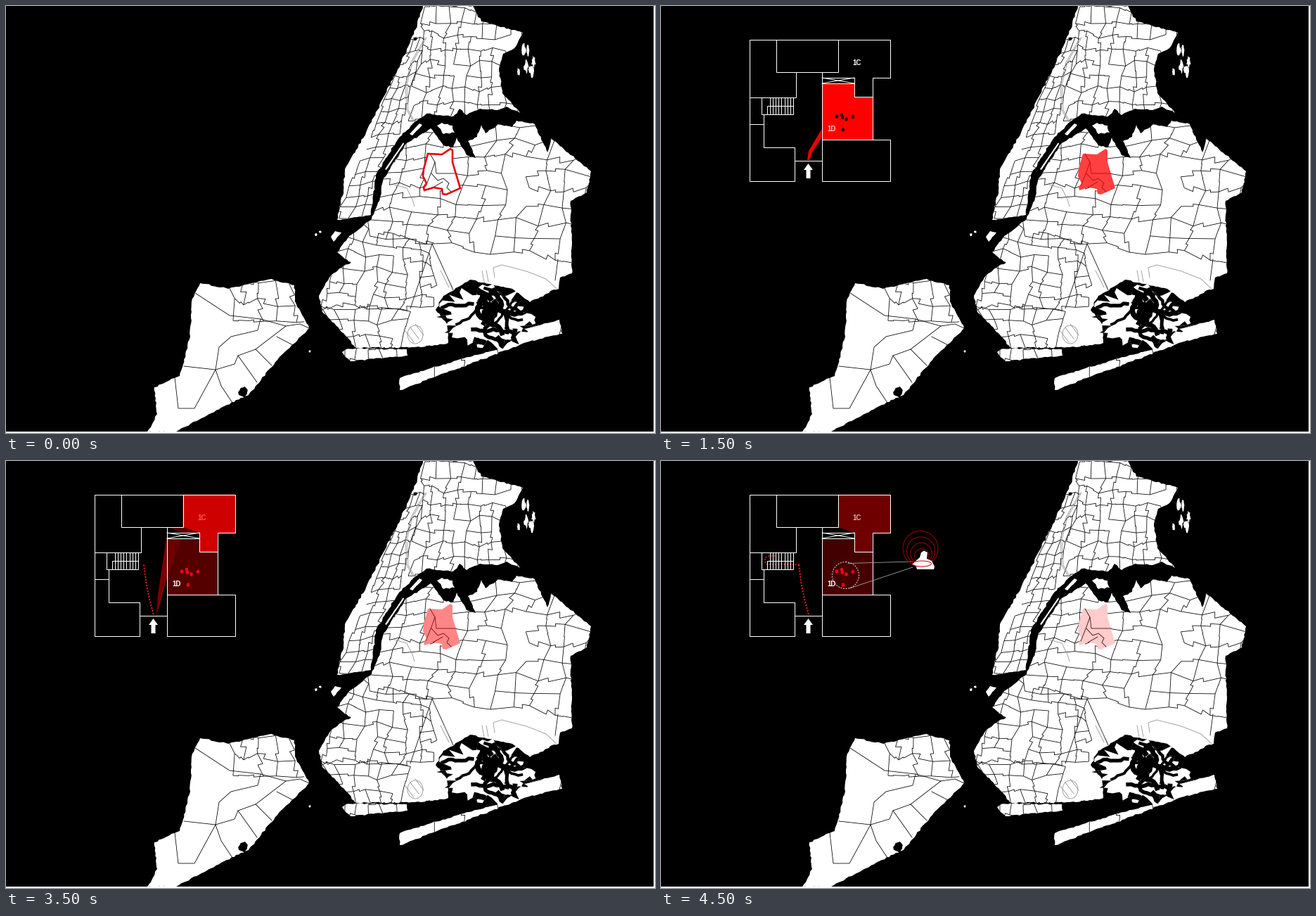
A matplotlib script that plays this animation: 923 px wide and 607 px high, repeating every 5 s.

```python
import math
import random

import matplotlib.pyplot as plt
from matplotlib.animation import FuncAnimation
from matplotlib.collections import LineCollection
from matplotlib.patches import Circle, Ellipse, Polygon, Rectangle

W, H, DPI = 923, 607, 100
PX = 72 / DPI
STEP_MS, STEPS = 500, 10

rng = random.Random(11)
fig = plt.figure(figsize=(W / DPI, H / DPI), dpi=DPI, facecolor="white")
ax = fig.add_axes([0, 0, 1, 1])
ax.set_xlim(0, W)
ax.set_ylim(H, 0)
ax.axis("off")


def pairs(flat):
    return list(zip(flat[::2], flat[1::2]))


def mix(a, b, t):
    return a[0] + (b[0] - a[0]) * t, a[1] + (b[1] - a[1]) * t


def poly(pts, color, z=1, alpha=1, edge="none", lw=0):
    return ax.add_patch(Polygon(pts, closed=True, fc=color, ec=edge,
                                lw=lw * PX, alpha=alpha, zorder=z))


def line(flat, color="black", lw=0.8, z=3, **kw):
    return ax.plot(flat[::2], flat[1::2], color=color, lw=lw * PX, zorder=z,
                   solid_joinstyle="miter", **kw)[0]


def disc(x, y, rx, ry, color="none", z=8, **kw):
    kw.setdefault("ec", "none")
    return ax.add_patch(Ellipse((x, y), 2 * rx, 2 * ry, fc=color, zorder=z, **kw))


# ---- map ----

def land(*flat, amp=1.0):
    """Closed coast through key points, roughened every few pixels."""
    pts, out = pairs(flat), []
    for a, b in zip(pts, pts[1:] + pts[:1]):
        n = max(1, round(math.dist(a, b) / 4))
        for k in range(n):
            x, y = mix(a, b, k / n)
            j = amp if k else 0
            out.append((x + rng.uniform(-j, j), y + rng.uniform(-j, j)))
    return poly(out, "white")


def blob(x, y, rx, ry, color="white", z=2, n=14, low=0.6):
    pts = []
    for k in range(n):
        a, r = math.tau * k / n, rng.uniform(low, 1.15)
        pts.append((x + rx * r * math.cos(a), y + ry * r * math.sin(a)))
    return poly(pts, color, z)


def border(a, b):
    """Edge from a to b; some edges take a right-angled step half way."""
    if rng.random() < 0.45:
        return [a, b]
    s, t = rng.uniform(-0.13, 0.13), rng.uniform(0.3, 0.7)
    dx, dy = b[0] - a[0], b[1] - a[1]
    x, y = mix(a, b, t)
    return [a, (x + dy * s, y - dx * s), (x - dy * s, y + dx * s), b]


def districts(shape, nw, ne, se, sw, cols, rows, jitter=0.27, keep=0.88):
    """Uneven grid of district borders in a quad, clipped to the land."""
    def node(i, j):
        u = (i + rng.uniform(-jitter, jitter)) / cols
        v = (j + rng.uniform(-jitter, jitter)) / rows
        return mix(mix(nw, ne, u), mix(sw, se, u), v)

    grid = [[node(i, j) for i in range(cols + 1)] for j in range(rows + 1)]
    edges = []
    for j in range(rows + 1):
        for i in range(cols + 1):
            if i < cols and rng.random() < keep:
                edges.append(border(grid[j][i], grid[j][i + 1]))
            if j < rows and rng.random() < keep:
                edges.append(border(grid[j][i], grid[j + 1][i]))
    lines = LineCollection(edges, colors="black", linewidths=0.8 * PX, zorder=3)
    ax.add_collection(lines)
    lines.set_clip_path(shape)


def marsh(x, y, rx, ry, channels):
    """Ragged wetland cut by wandering channels."""
    shape = blob(x, y, rx, ry, n=60, low=0.72)
    for _ in range(channels):
        px, py = x + rng.uniform(-rx, rx), y + rng.uniform(-ry, ry)
        heading, path = rng.uniform(0, math.tau), []
        for _ in range(14):
            path += [px, py]
            heading += rng.uniform(-0.8, 0.8)
            px += 5 * math.cos(heading)
            py += 5 * math.sin(heading)
        line(path, lw=rng.uniform(2, 8), z=2.5).set_clip_path(shape)


ax.add_patch(Rectangle((0, 0), 921, 605, fc="black", ec="none", zorder=0))

north = land(593, 0, 580, 40, 557, 90, 512, 180, 482, 232, 480, 262, 471, 304,
             519, 297, 526, 240, 557, 190, 578, 168, 598, 153, 636, 157,
             645, 146, 655, 155, 674, 146, 699, 148, 712, 143, 731, 152,
             706, 124, 701, 92, 707, 68, 723, 60, 735, 38, 676, 22, 664, 0)
main = land(520, 303, 532, 272, 537, 245, 570, 195, 604, 174, 622, 198, 636, 201,
            641, 187, 655, 212, 668, 216, 657, 192, 670, 186, 676, 169, 682, 181,
            700, 168, 720, 172, 726, 163, 752, 168, 770, 208, 775, 188,
            832, 235, 826, 265, 803, 277, 805, 380, 788, 386, 786, 402,
            745, 421, 720, 402, 660, 389, 622, 412, 611, 432, 627, 452,
            629, 479, 590, 485, 497, 486, 480, 465, 450, 435, 445, 412,
            462, 383, 486, 365, 471, 350, 486, 330)
beach = land(478, 492, 485, 487, 570, 488, 571, 497, 490, 505)
spit = land(560, 529, 640, 504, 705, 487, 735, 460, 787, 446, 791, 466,
            740, 478, 660, 509, 560, 546)
isle = land(276, 394, 316, 402, 378, 388, 410, 397, 411, 420, 431, 458,
            388, 500, 345, 553, 310, 569, 242, 605, 201, 605, 215, 580,
            211, 542, 247, 526, 262, 470, 264, 420)
land(462, 328, 468, 320, 477, 322, 466, 335)
land(613, 170, 620, 166, 635, 170, 638, 180, 622, 182)
land(539, 232, 565, 194, 566, 196, 541, 233, amp=0.2)
land(574, 182, 588, 167, 592, 169, 578, 184, amp=0.5)
for x, y in [(447, 321), (441, 325), (432, 491)]:
    blob(x, y, 2, 2)
for _ in range(7):
    blob(rng.uniform(722, 752), rng.uniform(60, 98), rng.uniform(2, 4), rng.uniform(5, 13))
marsh(685, 442, 66, 42, 24)
blob(338, 549, 8, 9, "black", 4)
blob(582, 47, 3, 3, "black", 4)
for x, y in [(482, 364), (782, 407), (600, 487)]:
    blob(x, y, 9, 4, "black", 4)

districts(north, (572, 50), (596, 45), (526, 300), (470, 305), 3, 15, 0.18)
districts(north, (596, 0), (735, 10), (725, 155), (576, 158), 8, 8)
districts(main, (545, 180), (845, 165), (810, 362), (510, 325), 10, 8)
districts(main, (478, 305), (606, 338), (612, 430), (450, 430), 7, 6)
districts(main, (450, 430), (575, 430), (562, 487), (470, 490), 6, 3)
districts(beach, (478, 485), (572, 485), (572, 505), (478, 505), 5, 1)
districts(spit, (560, 520), (790, 440), (790, 470), (560, 550), 5, 1, 0.1)
districts(isle, (322, 398), (425, 392), (430, 450), (318, 442), 5, 2)

for road in [
    (269, 408, 318, 440, 362, 445, 398, 455, 418, 452, 431, 458),
    (362, 445, 358, 461, 320, 470, 303, 485, 298, 517, 306, 540, 322, 564),
    (253, 512, 298, 517, 325, 509, 330, 497, 355, 488, 398, 455),
    (298, 517, 268, 572, 245, 572, 240, 528),
    (355, 488, 378, 511), (330, 497, 357, 535), (385, 470, 408, 482),
    (785, 360, 781, 390), (575, 430, 606, 338, 636, 404),
]:
    line(road)

GRAY = "#909090"
for dx in (0, 2):
    line((596 + dx, 45, 576 + dx, 80, 568 + dx, 112, 570 + dx, 148, 578 + dx, 162), GRAY)
for x in (618, 623, 677, 683):
    line((x, 376, x + 12 - (x > 650) * 9, 400 - (x > 650) * 8), GRAY)
line((552, 254, 570, 259, 578, 275, 581, 285), GRAY)
line((695, 386, 693, 372, 705, 368, 740, 377, 768, 388, 783, 402), GRAY)
for k in range(3):
    line((568 + 7 * k, 462 - 5 * k, 580 + 7 * k, 478 - 5 * k), GRAY)
disc(582, 467, 11, 13, ec=GRAY, lw=0.8 * PX, z=3)

DISTRICT = pairs([600, 210, 620, 211, 632, 203, 635, 205, 635, 222, 646, 259,
                  626, 268, 621, 267, 620, 260, 608, 258, 595, 262, 594, 258,
                  598, 252, 593, 242, 594, 232])
poly(DISTRICT, "white", 3.2)
for inner in [(603, 210, 610, 222, 605, 236, 597, 256), (610, 222, 612, 238, 640, 238),
              (605, 238, 614, 248, 622, 245, 630, 252, 627, 258, 633, 264),
              (607, 258, 621, 250)]:
    line(inner, z=3.4)


# ---- floor plan ----

def box(x0, y0, x1, y1):
    return x0, y0, x1, y0, x1, y1, x0, y1, x0, y0


def floor_plan():
    paths = [
        (190, 249, 125.5, 249, 125.5, 47.5, 326, 47.5, 326, 102, 300.5, 102, 300.5, 190),
        (164, 47.5, 164, 93.5, 251.5, 93.5, 251.5, 47.5),
        (192, 93.5, 192, 129.5, 125.5, 129.5),
        (229, 190, 229, 93.5), box(229, 190, 326, 249), box(229, 102, 275, 110),
        (275, 102, 275, 129, 300.5, 129),
        (229, 102, 275, 110), (229, 110, 275, 102),
        box(142.5, 129.5, 188, 154), (150.5, 154, 150.5, 142, 188, 142),
        (146, 154, 146, 201, 190, 201, 190, 249),
        (125.5, 168, 146, 168), (190, 219.5, 229, 219.5),
    ]
    paths += [(x, 129.5, x, 154) for x in (154.5 + 4.2 * k for k in range(8))]
    arrow = [(209.5, 224), (216, 233), (212.5, 233), (212.5, 245),
             (206.5, 245), (206.5, 233), (203, 233)]
    return [line(p, "white", 1, 8) for p in paths] + [poly(arrow, "white", 8)]


def red(v):
    return (v / 255, 0, 0)


def label(s, x, y, color):
    return ax.text(x, y, s, color=color, size=9.8 * PX, weight="bold", ha="center",
                   va="center_baseline", family="Liberation Sans", zorder=9)


ROOM_D = pairs([229, 110, 275, 110, 275, 129, 300.5, 129, 300.5, 190, 229, 190])
ROOM_C = pairs([251.5, 47.5, 326, 47.5, 326, 102, 300.5, 102, 300.5, 129,
                275, 129, 275, 102, 251.5, 94])
PEOPLE = [(250, 157), (257, 154.5), (258, 158.5), (263.5, 161), (273, 157.5), (259, 176)]
HALL = (209.5, 217, 205, 200, 200.5, 180, 198, 163, 196, 147)
STAIRS = (196, 147, 151, 147, 147.5, 143, 148.5, 137, 154, 135, 164, 135)


def people(color):
    return [disc(x, y, 2.3, 2.7, color, 7) for x, y in PEOPLE]


def dots(flat, color="#e02020"):
    return line(flat, color, 2.4, 7, ls=(0, (0.01, 1.7)), dash_capstyle="round")


def beam(*flat, v=235, alpha=1):
    return poly(pairs(flat), red(v), 6, alpha)


def far_beam(v):
    return [beam(214, 218, 216, 190, 229, 104, 229, 165, 220, 200, v=v),
            beam(229, 110, 250, 110, 229, 165, v=v, alpha=0.55),
            beam(231, 94, 251, 94, 275, 102, 250, 102, v=v, alpha=0.7)]


def zoom_ring():
    return [disc(262.5, 162.5, 19, 19, z=9, ec="#dddddd", lw=PX, ls=(0, (2, 1.6)))]


def speaker():
    parts = [line((266, 145.5, 358, 143), "#aaaaaa", 0.8, 8),
             line((268, 181, 358, 151), "#aaaaaa", 0.8, 8)]
    for k in range(4):
        parts.append(ax.add_patch(Circle((369 + 0.6 * k, 124.5 + 3.5 * k), 25 - 4.9 * k,
                                         fc="none", ec=red(155), lw=PX, zorder=8)))
    body = pairs([357, 147, 368, 137, 370, 130, 374, 127.5, 379, 130, 378, 139,
                  385, 142, 389, 150, 388, 154, 372, 154, 364, 154, 363, 150])
    return parts + [poly(body, "white", 9),
                    disc(371, 146, 13.5, 4, z=10, ec=red(215), lw=PX)]


plan = floor_plan()


def scene(parts, fade=0, d=0, c=0, d_text="white", c_text="white"):
    """fade counts the steps since the district began to pale."""
    out = plan + parts + [poly(DISTRICT, "red", 5, 0.75 - 0.137 * fade),
                          label("1C", 279, 79.5, c_text), label("1D", 243, 174, d_text)]
    if d:
        out.append(poly(ROOM_D, red(d), 5))
    if c:
        out.append(poly(ROOM_C, red(c), 5))
    return out


def afterglow(k, parts, c_text):
    """Room 1C was entered at k = 1; both rooms darken step by step."""
    return scene(people("#f5001a") + [dots(HALL)] + parts, k,
                 92 - 8 * (k - 1), 255 - 48 * (k - 1), c_text=c_text)


outline = [poly(DISTRICT, "none", 5, edge="#e8000b", lw=2.6)]
door = scene(people("#141414") + [beam(208, 219, 209, 209, 214, 198, 213, 210)])
room_d = scene(people("#3a0000")
               + [beam(208, 219, 210, 206, 228.5, 175, 228.5, 187, 215, 208, 211, 219)],
               d=255, d_text="#ffc8c8")
swing = scene(people("#2c0000")
              + [beam(213, 219, 215, 198, 219, 157, 221, 195, 218, 214)], d=92)
climb = [dots(STAIRS, "#b01818")] + zoom_ring()
timeline = [outline, door, door, room_d, room_d, swing,
            afterglow(1, far_beam(200), "#ff9090"),
            afterglow(2, far_beam(125), "#ff5a5a"),
            afterglow(3, climb, "#ee9090"),
            afterglow(4, climb + speaker(), "#e0b0b0")]
every = {a for step in timeline for a in step}


def update(i):
    shown = set(timeline[i % STEPS])
    for a in every:
        a.set_visible(a in shown)
    return list(every)


anim = FuncAnimation(fig, update, frames=STEPS, interval=STEP_MS,
                     repeat=True, repeat_delay=0, blit=False)
plt.show()
```
